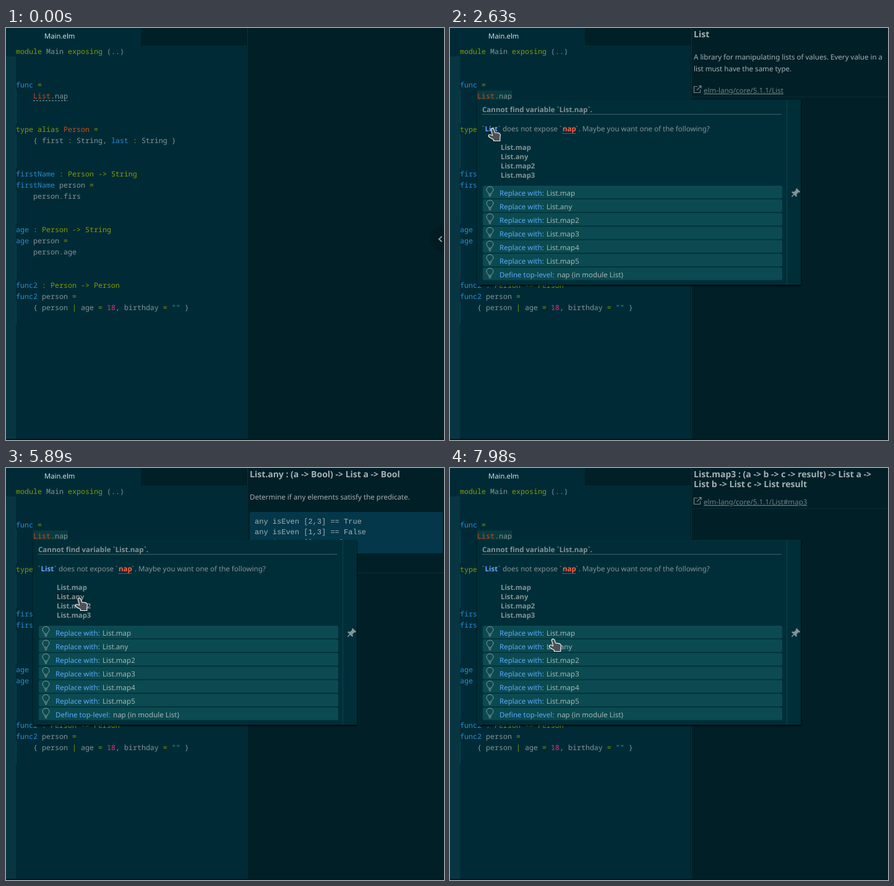
Animation, 708 px wide and 666 px high, one loop 8000 ms. Source, as an HTML page:

```html
<!DOCTYPE html>
<html lang="en">
<head>
<meta charset="utf-8">
<title>Editor hover hints</title>
<style>
  html, body { margin: 0; width: 100%; height: 100%; overflow: hidden; background: #001f27; }
  svg { display: block; text-rendering: geometricPrecision; }
  text { white-space: pre; font: 11.55px "Noto Sans", "Open Sans", sans-serif; }
  text.code { font: 11.667px "Noto Sans Mono", "DejaVu Sans Mono", monospace; }
  text.sample { font: 12px "Liberation Mono", monospace; }
  text.bold { font-weight: 700; }
  text.item { font-size: 11.35px; }
  text.heading { font-size: 14px; font-weight: 700; }
  text.tab { font-size: 11.3px; }
  text.link { text-decoration: underline; }
</style>
</head>
<body>
<svg id="stage" width="708" height="666" viewBox="0 0 708 666"></svg>
<script>
const LOOP = 8000;
const INK = '#839496', PALE = '#a3b2b3', LINK = '#5aa9ff';
const palette = { t: INK, g: '#859900', b: '#268bd2', o: '#cb4b16', c: '#2aa198', m: '#d33682' };

const rect = (x, y, w, h, fill, extra = '') =>
  `<rect x="${x}" y="${y}" width="${w}" height="${h}" fill="${fill}" ${extra}/>`;
const line = (x1, y1, x2, y2, stroke, extra = '') =>
  `<line x1="${x1}" y1="${y1}" x2="${x2}" y2="${y2}" stroke="${stroke}" ${extra}/>`;
const escapeText = s => s.replace(/&/g, '&amp;').replace(/</g, '&lt;').replace(/>/g, '&gt;');
const text = (x, y, s, fill, cls = '') =>
  `<text x="${x}" y="${y}" fill="${fill}" class="${cls}">${escapeText(s)}</text>`;
const group = (id, body, extra = '') => `<g id="${id}" ${extra}>${body}</g>`;

// Row number and source; ^x switches to palette colour x.
const source = [
  [0, '^gmodule ^tMain ^gexposing ^t(..)'],
  [3, '^bfunc ^g='],
  [4, '    ^oList^g.^tnap'],
  [7, '^gtype alias ^oPerson ^g='],
  [8, '    ^t{ first ^g: ^tString, ^blast ^g: ^tString }'],
  [11, '^bfirstName ^g: Person -> String'],
  [12, '^bfirstName ^tperson ^g='],
  [13, '    ^tperson^g.^tfirs'],
  [16, '^bage ^g: Person -> String'],
  [17, '^bage ^tperson ^g='],
  [18, '    ^tperson^g.^tage'],
  [21, '^bfunc2 ^g: Person -> Person'],
  [22, '^bfunc2 ^tperson ^g='],
  [23, '    ^t{ person ^g| ^tage ^g= ^m18^t, birthday ^g= ^c"" ^t}']
];
const guides = [[4, 3], [8, 3], [13, 3], [18, 3], [23, 2]];

function codeLine([row, markup]) {
  const [indent, ...parts] = markup.split('^');
  const spans = parts.map(p => `<tspan fill="${palette[p[0]]}">${escapeText(p.slice(1))}</tspan>`);
  return `<text class="code" x="16" y="${42 + row * 18}">${indent}${spans.join('')}</text>`;
}

function editor() {
  return rect(0, 0, 708, 666, '#001f27') +
    rect(0, 0, 218, 28, '#002b36') +
    rect(0, 28, 389, 636, '#002b36') +
    rect(0, 28, 16, 636, '#073642') +
    rect(0, 28, 16, 18, '#002b36') +
    rect(390, 0, 1, 666, '#0b323c') +
    text(62, 17, 'Main.elm', '#d5dfe0', 'tab') +
    guides.map(([row, n]) => rect(16, 28 + row * 18, 1, n * 18, '#0b4350')).join('') +
    group('highlight', rect(44, 101, 56, 16, '#0a3a40')) +
    source.map(codeLine).join('') +
    line(44, 117.5, 100, 117.5, '#6d9fb5', 'stroke-dasharray="3 2"');
}

const docs = [
  { title: ['List'],
    body: ['A library for manipulating lists of values. Every value in a', 'list must have the same type.'],
    code: [], link: 'List', linkY: 105 },
  { title: ['List.map : (a -> b) -> List a -> List b'],
    body: ['Apply a function to every element of a list.'],
    code: ['map sqrt [1,4,9] == [1,2,3]', '', 'map not [True,False,True] == [False,True,', 'False]'],
    link: 'List#map', linkY: 180 },
  { title: ['List.any : (a -> Bool) -> List a -> Bool'],
    body: ['Determine if any elements satisfy the predicate.'],
    code: ['any isEven [2,3] == True', 'any isEven [1,3] == False', 'any isEven [] == False'],
    link: 'List#any', linkY: 163 },
  { title: ['List.map2 : (a -> b -> result) -> List a -> List b -', '> List result'],
    body: ['Combine two lists, combining them with the given', 'function. If one list is longer, the extra elements are', 'dropped.'],
    code: ['map2 (+) [1,2,3] [1,2,3,4] == [2,4,6]', '', "map2 (,) [1,2,3] ['a','b'] == [ (1,'a'),", "(2,'b') ]", '',
      'pairs : List a -> List b -> List (a,b)', 'pairs lefts rights =', '    map2 (,) lefts rights'],
    link: 'List#map2', linkY: 302 },
  { title: ['List.map3 : (a -> b -> c -> result) -> List a ->', 'List b -> List c -> List result'],
    body: [], code: [], link: 'List#map3', linkY: 59 }
];

function docPanel({ title, body, code, link, linkY }, i) {
  const shift = (title.length - 1) * 16;
  const top = Math.round(71 + shift + (body.length - 1) * 18.8);
  const block = code.length
    ? rect(394, top, 312, code.length * 17 + 16, '#033749', 'rx="3"') +
      code.map((s, n) => text(402, top + 19 + n * 17, s, PALE, 'sample')).join('')
    : '';
  const icon = `<path d="M400 ${linkY - 10.5}h-5.5v10h10v-5M402 ${linkY - 11.5}h4v4M406 ${linkY - 11.5}l-7 7"
    fill="none" stroke="#738789" stroke-width="1.2"/>`;
  return group('doc' + i,
    title.map((s, n) => text(394, 15 + n * 16, s, PALE, 'heading')).join('') +
    body.map((s, n) => text(394, Math.round(51 + shift + n * 18.7), s, PALE)).join('') +
    block + icon +
    text(410, linkY, 'elm-lang/core/5.1.1/' + link, '#6f8385', 'link') +
    line(391, linkY + 6.5, 708, linkY + 6.5, '#0a2d36'));
}

const names = ['List.map', 'List.any', 'List.map2', 'List.map3'];
const fixes = [...names, 'List.map4', 'List.map5'].map(n => ['Replace with:', n, 156])
  .concat([['Define top-level:', 'nap (in module List)', 173]]);

function fixRow([action, detail, x], i) {
  const y = 255 + i * 22;
  return rect(53, y, 484, 20.5, '#0b4a50', 'rx="2.5"') +
    `<path transform="translate(64.5 ${y + 7.5})" d="M-2.3 5.5C-2.3 3-5.5 2-5.5-1A5.5 5.2 0 0 1 5.5-1C5.5 2 2.3 3 2.3 5.5ZM-2.3 7.5H2.3M-1.5 9.5H1.5"
      fill="none" stroke="#8ba1a1"/>` +
    text(80, y + 16, action, LINK) + text(x, y + 16, detail, '#a5b5b5');
}

function popup() {
  return rect(44, 116, 523, 299, '#002f39', 'filter="url(#shadow)"') +
    rect(544, 116, 1, 299, '#0c424c') +
    text(52, 136, 'Cannot find variable `List.nap`.', INK, 'bold') +
    line(52, 139.5, 536, 139.5, '#7b9193', 'stroke-dasharray="1 1"') +
    rect(0, 0, 0, 0, '#04262f', 'id="hover"') +
    text(52, 167, '`', INK) + text(56.5, 167, 'List', '#64a4ff', 'bold') + text(78, 167, '`', INK) +
    text(85, 167, 'does not expose `', INK) + text(182, 167, 'nap', '#ff6347', 'bold') +
    line(182, 170.5, 203, 170.5, '#ff6347', 'stroke-dasharray="1 1"') +
    text(203.5, 167, '`', INK) + text(208, 167, '. Maybe you want one of the following?', INK) +
    names.map((n, i) => text(82, 197 + i * 15, n, INK, 'bold item')).join('') +
    fixes.map(fixRow).join('') +
    `<path transform="translate(559 266) rotate(45)" fill="${INK}"
      d="M-4-6H4V-4L2.8-3V1L5.5 3V4.5H-5.5V3L-2.8 1V-3L-4-4ZM-.8 4H.8V9.5H-.8Z"/>`;
}

const beam = 'M-4-8.5H-2Q0-8.5 0-7Q0-8.5 2-8.5H4M0-7V7M-4 8.5H-2Q0 8.5 0 7Q0 8.5 2 8.5H4';
const pointers =
  group('beam', `<path d="${beam}" fill="none" stroke="#111c20" stroke-width="3.4"/>
    <path d="${beam}" fill="none" stroke="#f4f6f6" stroke-width="1.5"/>`) +
  group('arrow', '<path d="M0 0V15L3.6 11.7L6 17L8.5 15.8L6.2 10.7H11Z" fill="#474b4e" stroke="#f0f2f2"/>') +
  group('hand', `<path d="M-2.8 2Q-1.2-.8 1.6 1.2L3.9 7.2L9 7.6Q12.3 8.2 12.4 11.5L11.8 16.5V20.5H1.5V18.5
    L-5 14.8Q-7.6 12.8-6.4 11Q-4.6 9.4-1.8 11.2L-.2 11.8Z" fill="#4d5254" stroke="#eef1f1" stroke-width="1.2" stroke-linejoin="round"/>`);

document.getElementById('stage').innerHTML =
  `<filter id="shadow" x="-5%" y="-5%" width="110%" height="110%">
    <feDropShadow dx="0" dy="2" stdDeviation="1.5" flood-color="#000" flood-opacity=".85"/></filter>` +
  editor() + docs.map(docPanel).join('') +
  group('dock', '<circle cx="708" cy="341" r="22" fill="#001b22"/><path d="M704.5 337L700 341.2L704.5 345.5" fill="none" stroke="#93a1a1" stroke-width="1.8"/>') +
  rect(0, 664, 708, 2, '#001a21') +
  group('popup', popup()) + group('pointer', pointers);

const el = id => document.getElementById(id);
const show = (id, on) => el(id).setAttribute('display', on ? 'inline' : 'none');

// Pointer hotspot: time, x, y.
const path = [
  [290, 706, 320], [490, 560, 150], [650, 380, 48], [800, 225, 30], [1090, 93, 105], [1170, 90, 106],
  [2120, 90, 106], [2360, 94, 250], [2630, 69, 162],
  [3620, 69, 162], [4100, 105, 190], [4470, 105, 190], [4510, 107, 191], [4590, 108, 192],
  [4740, 108, 192], [5060, 118, 209], [5850, 118, 209], [5890, 119, 210], [6240, 121, 217],
  [6770, 121, 217], [7090, 123, 231], [7740, 123, 231], [7830, 72, 252], [7920, 180, 272], [7980, 167, 276]
];
const docTimes = [2560, 3960, 4900, 6100, 6930];
const hoverEnds = [3700, 4900, 6100, 6930, 7780];

function pointerAt(t) {
  const next = path.findIndex(p => p[0] > t);
  if (next < 0) return path[path.length - 1].slice(1);
  if (next === 0) return path[0].slice(1);
  const [t0, x0, y0] = path[next - 1], [t1, x1, y1] = path[next];
  const k = (t - t0) / (t1 - t0), e = k * k * (3 - 2 * k) * .5 + k * .5;
  return [x0 + (x1 - x0) * e, y0 + (y1 - y0) * e];
}

function render(t) {
  const open = t >= 1370;
  show('popup', open);
  show('highlight', open);
  const current = docTimes.filter(start => t >= start).length - 1;
  docs.forEach((_, i) => show('doc' + i, i === current));
  el('dock').setAttribute('opacity', Math.max(0, Math.min(1, 1 - (t - 290) / 160)));

  const hovering = current >= 0 && t < hoverEnds[current];
  const box = current === 0 ? [56, 157, 22, 13] : [82, 186 + (current - 1) * 15, current > 2 ? 55 : current > 1 ? 45 : 49, 14];
  ['x', 'y', 'width', 'height'].forEach((name, i) => el('hover').setAttribute(name, box[i]));
  show('hover', hovering);

  const [x, y] = pointerAt(t);
  el('pointer').setAttribute('transform', `translate(${x.toFixed(1)} ${y.toFixed(1)})`);
  show('pointer', t >= 290);
  const hand = hovering || t >= 3960;
  const inEditor = t < 2160 && x < 390;
  show('hand', hand);
  show('beam', !hand && inEditor);
  show('arrow', !hand && !inEditor);
}

function tick(now) {
  render(now % LOOP);
  requestAnimationFrame(tick);
}
render(0);
requestAnimationFrame(tick);
</script>
</body>
</html>
```
